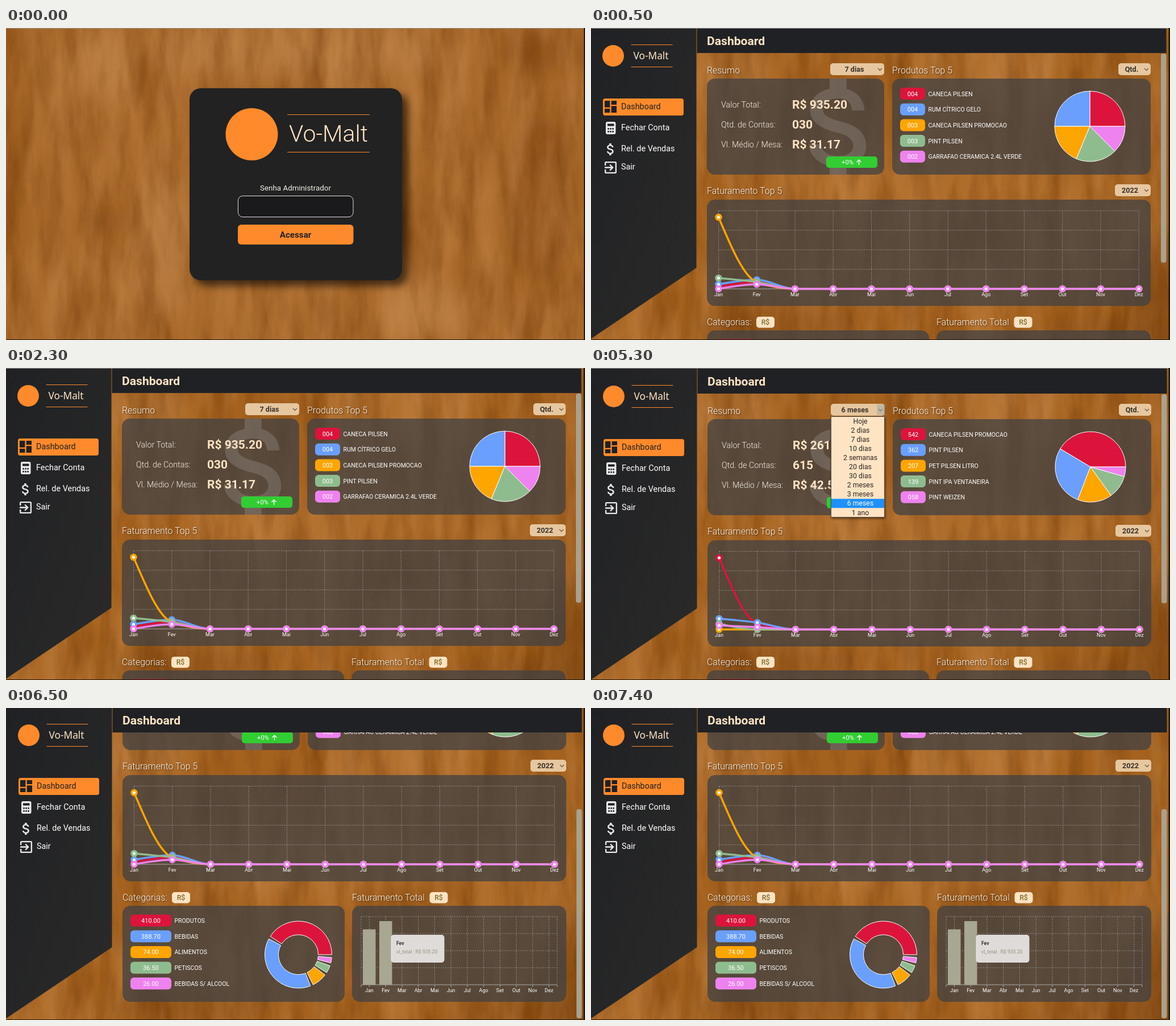
Animation of 1019 by 549 pixels, one loop 8 s. Source, as an HTML page:

```html
<!DOCTYPE html>
<html lang="pt">
<head>
<meta charset="utf-8">
<title>Dashboard</title>
<style>
  html, body { margin: 0; width: 100%; height: 100%; overflow: hidden; background: #a4642a; }
  #stage { display: block; font-family: Roboto, sans-serif; }
  .head { filter: drop-shadow(1px 1px 1px #0009); }
</style>
</head>
<body>
<svg id="stage" width="1019" height="549" viewBox="0 0 1019 549">
  <defs>
    <filter id="dark" x="0" y="0" width="1" height="1" color-interpolation-filters="sRGB">
      <feTurbulence type="fractalNoise" baseFrequency=".03 .007" numOctaves="5" seed="7"/>
      <feColorMatrix values="0 0 0 0 .4  0 0 0 0 .19  0 0 0 0 0  .9 0 0 0 -.36"/>
    </filter>
    <filter id="light" x="0" y="0" width="1" height="1" color-interpolation-filters="sRGB">
      <feTurbulence type="fractalNoise" baseFrequency=".024 .005" numOctaves="5" seed="21"/>
      <feColorMatrix values="0 0 0 0 .84  0 0 0 0 .6  0 0 0 0 .36  0 .8 0 0 -.32"/>
    </filter>
    <filter id="soft" x="-1" y="-1" width="3" height="3"><feGaussianBlur stdDeviation="22"/></filter>
    <filter id="shade" x="-.2" y="-.2" width="1.4" height="1.4">
      <feDropShadow dx="10" dy="10" stdDeviation="7" flood-color="#000" flood-opacity=".6"/>
    </filter>
    <linearGradient id="side" x2="1" y2="1">
      <stop stop-color="#202124"/><stop offset="1" stop-color="#2a2a29"/>
    </linearGradient>
  </defs>
</svg>
<script>
const ORANGE = '#ff8a2b', CREAM = '#ffe4c4', INK = '#202124', SAND = '#e6c79f';
const COLORS = ['#dc143c', '#6a9fff', '#ffa500', '#8fbc8f', '#ee82ee'];
const MONTHS = 'Jan Fev Mar Abr Mai Jun Jul Ago Set Out Nov Dez'.split(' ');
const BRAND = 'Vo-Malt';
const DOLLAR = 'M11.8 10.9c-2.27-.59-3-1.2-3-2.15 0-1.09 1.01-1.85 2.7-1.85 1.78 0 2.44.85 2.5 2.1h2.21c-.07-1.72-1.12-3.3-3.21-3.81V3h-3v2.16c-1.94.42-3.5 1.68-3.5 3.61 0 2.31 1.91 3.46 4.7 4.13 2.5.6 3 1.48 3 2.41 0 .69-.49 1.79-2.7 1.79-2.06 0-2.87-.92-2.98-2.1h-2.2c.12 2.19 1.76 3.42 3.68 3.83V21h3v-2.15c1.95-.37 3.5-1.5 3.5-3.55 0-2.84-2.43-3.81-4.7-4.4z';

const WEEK = {
  range: '7 dias', total: '935.20', bills: '030', mean: '31.17',
  products: [['004', 'CANECA PILSEN'], ['004', 'RUM CÍTRICO GELO'], ['003', 'CANECA PILSEN PROMOCAO'],
    ['003', 'PINT PILSEN'], ['002', 'GARRAFAO CERAMICA 2.4L VERDE']],
  lines: [[455, 447], [451, 443], [333, 447], [440, 447], [459, 451]]
};
const HALF_YEAR = {
  range: '6 meses', total: '26160.10', bills: '615', mean: '42.54',
  products: [['542', 'CANECA PILSEN PROMOCAO'], ['362', 'PINT PILSEN'], ['207', 'PET PILSEN LITRO'],
    ['139', 'PINT IPA VENTANEIRA'], ['058', 'PINT WEIZEN']],
  lines: [[333, 448], [440, 447], [459, 459], [449, 459], [452, 455]]
};
const CATEGORIES = [['410.00', 'PRODUTOS'], ['388.70', 'BEBIDAS'], ['74.00', 'ALIMENTOS'],
  ['36.50', 'PETISCOS'], ['26.00', 'BEBIDAS S/ ALCOOL']];
const RANGES = ['Hoje', '2 dias', '7 dias', '10 dias', '2 semanas', '20 dias', '30 dias', '2 meses', '3 meses', '6 meses', '1 ano'];

const text = (x, y, str, size, fill = '#f4eee6', extra = '') =>
  `<text x="${x}" y="${y}" font-size="${size}" fill="${fill}" ${extra}>${str}</text>`;
const MID = 'text-anchor="middle"', BOLD = 'font-weight="700"', THIN = 'font-weight="300"';
const mid = (x, y, str, size, fill, extra = '') => text(x, y, str, size, fill, MID + ' ' + extra);
const box = (x, y, w, h, r, fill, extra = '') =>
  `<rect x="${x}" y="${y}" width="${w}" height="${h}" rx="${r}" fill="${fill}" ${extra}/>`;
const path = (d, fill, extra = '') => `<path d="${d}" fill="${fill}" ${extra}/>`;
const stroke = (d, color, width = 1, extra = '') =>
  path(d, 'none', `stroke="${color}" stroke-width="${width}" ${extra}`);
const at = (x, y, body, scale = 1) => `<g transform="translate(${x} ${y}) scale(${scale})">${body}</g>`;
const card = (x, y, w, h) => box(x, y, w, h, 14, '#404244', 'fill-opacity=".74"');
const heading = (x, y, str) => text(x, y, str, 15.9, '#fff6ea', THIN + ' class="head"');

function wall(base, blots) {
  const spots = blots.map(([x, y, rx, ry, c]) =>
    `<ellipse cx="${x}" cy="${y}" rx="${rx}" ry="${ry}" fill="${c}" opacity=".5" filter="url(#soft)"/>`).join('');
  return box(0, 0, 1019, 549, 0, base) + spots +
    box(0, 0, 1019, 549, 0, '#000', 'filter="url(#dark)"') + box(0, 0, 1019, 549, 0, '#000', 'filter="url(#light)"');
}
const edges = right => box(right, 0, 1019 - right, 549, 0, '#21170f') + box(0, 548, 1019, 1, 0, '#21170f');
const topLine = box(0, 0, 1019, 1, 0, '#95918d');

function login() {
  const umber = '#7d430c', tan = '#c48a50';
  return wall('#a8682a', [[0, 200, 16, 400, umber], [930, 40, 60, 40, umber], [180, 340, 60, 22, umber],
      [500, 40, 260, 50, tan], [170, 60, 60, 60, tan], [270, 390, 50, 130, tan], [740, 500, 80, 50, tan], [940, 300, 60, 150, umber]]) +
    topLine + edges(1017) + box(323, 106, 374, 338, 20, INK, 'filter="url(#shade)"') +
    `<circle cx="432.5" cy="187" r="46" fill="${ORANGE}"/>` +
    stroke('M495 152.5H640M495 218.5H640', ORANGE) +
    mid(567.5, 200, BRAND, 41, CREAM, THIN) +
    mid(509.5, 286, 'Senha Administrador', 13.4) +
    box(408.5, 295.5, 202.5, 37, 8, '#1a1a1d', 'stroke="#e4e4e4"') +
    box(408, 346, 203.5, 35, 6, ORANGE) + mid(509.5, 369, 'Acessar', 15.2, INK, BOLD);
}

function sidebar() {
  const light = '#e9e9e9', keys = [0, 1, 2].map(i =>
    box(29.3 + i * 4, 176, 2.6, 2.6, 0, INK) + box(29.3 + i * 4, 181, 2.6, 2.6, 0, INK)).join('');
  return path('M-2 -2H185.5V422L-2 548z', 'url(#side)') +
    `<circle cx="39" cy="49" r="19" fill="${ORANGE}"/>` +
    stroke('M70.5 29.5H143.5M70.5 68.5H143.5', ORANGE) +
    mid(105.5, 55, BRAND, 17.3, CREAM, 'font-family="Noto Sans, sans-serif"') +
    box(21, 124, 142, 30, 4, ORANGE) +
    at(20.5, 124.5, path('M3 13h8V3H3zm0 8h8v-6H3zm10 0h8V11h-8zm0-18v6h8V3z', INK), 1.17) +
    box(26, 165, 17.5, 22, 3, light) + box(29, 168.5, 11.5, 4, 0, INK) + keys +
    at(20.5, 199.5, path(DOLLAR, light), 1.17) +
    at(20.5, 231.5, path('M10.1 15.6 11.5 17l5-5-5-5-1.4 1.4L12.7 11H3v2h9.7zM19 3H5c-1.1 0-2 .9-2 2v4h2V5h14v14H5v-4H3v4c0 1.1.9 2 2 2h14c1.1 0 2-.9 2-2V5c0-1.1-.9-2-2-2z', light), 1.17) +
    text(53, 143, 'Dashboard', 14.4, INK) +
    text(53, 180, 'Fechar Conta', 14.4, '#fff') + text(53, 217, 'Rel. de Vendas', 14.4, '#fff') + text(53, 249, 'Sair', 14.4, '#fff');
}

const select = (x, y, w, str) => box(x, y, w, 21, 5, SAND) +
  mid(x + w / 2 - 5, y + 14.7, str, 12.6, '#3a3129', BOLD) +
  stroke(`M${x + w - 11} ${y + 9}l3.5 3.5 3.5-3.5`, '#6b5b48', 1.3);

const legend = (rows, x, y, w) => rows.map(([value, name], i) => {
  const cy = y + i * 27.7;
  return box(x, cy - 10.5, w, 21, 6, COLORS[i]) + mid(x + w / 2, cy + 4, value, 11, '#fff') +
    text(x + w + 5.5, cy + 4, name, 10.5, '#fff');
}).join('');

// Slices run counter-clockwise from three o'clock.
function pie(rows, cx, cy, inner, outer, gap) {
  const sum = rows.reduce((s, r) => s + +r[0], 0), n = rows.length;
  const pt = (r, deg) => `${cx + r * Math.cos(deg * Math.PI / 180)} ${cy - r * Math.sin(deg * Math.PI / 180)}`;
  let a = 0;
  return rows.map(([v], i) => {
    const b = a + v / sum * (360 - n * gap), big = +(b - a > 180);
    const back = inner ? `L${pt(inner, b)}A${inner} ${inner} 0 ${big} 1 ${pt(inner, a)}` : `L${cx} ${cy}`;
    const d = `M${pt(outer, a)}A${outer} ${outer} 0 ${big} 0 ${pt(outer, b)}${back}z`;
    a = b + gap;
    return path(d, COLORS[i], 'stroke="#fff"');
  }).join('');
}

function grid(xs, top, bottom) {
  const left = xs[0], right = xs[xs.length - 1];
  const d = xs.map(x => `M${x} ${top}V${bottom}`).join('') +
    [0, 1, 2, 3].map(i => `M${left} ${top + i * (bottom - top) / 4}H${right}`).join('');
  return stroke(d, '#b5bcc0', 1, 'stroke-dasharray="2" opacity=".6"') + stroke(`M${left} ${bottom}H${right}`, '#aaa');
}

// Monotone cubic through evenly spaced points.
function curve(xs, ys) {
  const h = xs[1] - xs[0], n = xs.length, s = ys.slice(1).map((y, i) => (y - ys[i]) / h);
  const m = ys.map((_, i) => i && i < n - 1 ? (Math.sign(s[i - 1]) + Math.sign(s[i])) *
    Math.min(Math.abs(s[i - 1]), Math.abs(s[i]), Math.abs(s[i - 1] + s[i]) / 4) : 0);
  m[0] = (3 * s[0] - m[1]) / 2;
  return `M${xs[0]} ${ys[0]}` + s.map((_, i) =>
    `C${xs[i] + h / 3} ${ys[i] + m[i] * h / 3} ${xs[i + 1] - h / 3} ${ys[i + 1] - m[i + 1] * h / 3} ${xs[i + 1]} ${ys[i + 1]}`).join('');
}

function lineChart(lines) {
  const xs = MONTHS.map((_, i) => 224.5 + i * 67.25);
  return grid(xs, 321.5, 459) + xs.map((x, i) => mid(x, 472, MONTHS[i], 9, '#fff')).join('') +
    lines.map((start, k) => {
      const ys = xs.map((_, i) => start[i] ?? 459);
      return stroke(curve(xs, ys), COLORS[k], 3.4) + xs.map((x, i) =>
        `<circle cx="${x}" cy="${ys[i]}" r="4.4" fill="#fff" stroke="${COLORS[k]}" stroke-width="3.6"/>`).join('');
    }).join('');
}

function barChart() {
  const xs = MONTHS.map((_, i) => 638.4 + i * 28.75);
  return grid([624, ...xs, 969], 551, 671) +
    stroke([624, ...xs, 969].map(x => `M${x} 671v4`).join(''), '#aaa') +
    box(627, 573.5, 22.5, 97.5, 0, '#a8a791') + box(656, 559, 22.5, 112, 0, '#a8a791') +
    xs.map((x, i) => mid(x, 684, MONTHS[i], 9, '#fff')).join('') +
    box(676.5, 583, 94, 49, 5, '#ebe8e6', 'fill-opacity=".92"') +
    text(686, 601, 'Fev', 8.6, '#333', BOLD) + text(686, 616, 'vl_total : R$ 935.20', 8.6, '#96927f');
}

const badge = x => box(x, 508, 32, 19.5, 5, CREAM) + mid(x + 16, 522, 'R$', 12.3, '#7d6b2c', 'font-weight="500"');

function overview(d) {
  const row = (y, label, value) => text(229, y, label, 14.3, '#f4eee6', THIN) + text(354, y + 2, value, 21, CREAM, BOLD);
  return heading(204, 80, 'Resumo') + select(421, 62, 95, d.range) + card(204, 89, 312, 169) +
    `<svg x="204" y="89" width="312" height="169" viewBox="204 89 312 169">${at(321, 56, path(DOLLAR, '#d8dce0', 'opacity=".17"'), 9.9)}</svg>` +
    row(140, 'Valor Total:', 'R$ ' + d.total) + row(175, 'Qtd. de Contas:', d.bills) + row(210, 'Vl. Médio / Mesa:', 'R$ ' + d.mean) +
    box(414, 226, 90, 20, 5, '#32cd32') + mid(451.5, 240, '+0%', 11.2, '#fff') +
    stroke('M471.5 241V232M467.5 236l4-4 4 4', '#fff', 1.4) +
    heading(530, 80, 'Produtos Top 5') + select(928, 62, 57, 'Qtd.') + card(530, 89, 455, 169) +
    legend(d.products, 544, 115.5, 44) + pie(d.products, 878, 173, 0, 62, 0) +
    heading(204, 292, 'Faturamento Top 5') + select(922, 275, 63, '2022') + card(204, 302, 781, 187) + lineChart(d.lines);
}

const totals = () => heading(204, 523, 'Categorias:') + badge(291) + card(204, 532, 391, 169) +
  legend(CATEGORIES, 218, 558, 72) + pie(CATEGORIES, 513.5, 618, 35, 59, 5) +
  heading(608, 523, 'Faturamento Total') + badge(744.5) + card(608, 532, 377, 169) + barChart();

function dropdown() {
  const rows = RANGES.map((label, i) => {
    const on = label === HALF_YEAR.range, y = 84.8 + i * 16.05;
    return (on ? box(422, y, 93, 16, 0, '#1e90ff') : '') + mid(473, y + 12.2, label, 12.3, on ? '#fff' : '#2b2621');
  }).join('');
  return box(502, 63, 13.5, 19, 3, '#9aa4a0', 'opacity=".45"') + stroke('M515.5 63V82', '#6f99a8') +
    box(421.5, 84.5, 94, 177, 0, CREAM, 'stroke="#5a4c40" style="filter:drop-shadow(1px 2px 2px #0008)"') + rows;
}

function dashboard({ data, dx = 0, dy = 0, scroll = 0, lower = '0 0', thumb = 45, menu = '' }) {
  const content = `<svg x="186" y="44" width="826" height="505" viewBox="186 44 826 505">` +
    at(0, -scroll, overview(data) + `<g transform="translate(${lower})">${totals()}</g>`) + '</svg>';
  return wall('#a5621f', [[1000, 480, 60, 120, '#75400c'], [560, 280, 240, 60, '#b97838'], [700, 70, 120, 60, '#b97838'],
      [240, 80, 60, 40, '#c48a50'], [330, 520, 160, 30, '#7a430d'], [900, 540, 140, 30, '#7a430d'], [80, 540, 90, 30, '#b97838']]) +
    at(dx, dy, content + box(1003, thumb, 9.5, 368, 4, '#aaa18c') + sidebar() +
      box(186.5, 0, 826, 44, 0, INK) + text(204, 30, 'Dashboard', 21.1, CREAM, BOLD) + menu) +
    (dy < 0 ? '' : topLine) + edges(1016.5);
}

const scenes = [
  [0, login()],
  [500, dashboard({ data: WEEK })],
  [3500, dashboard({ data: HALF_YEAR, dx: 1, dy: 1, lower: '-1 -1', menu: dropdown() })],
  [6500, dashboard({ data: WEEK, dx: 1, dy: -1, scroll: 183, thumb: 179 })]
];
const stage = document.getElementById('stage');
stage.insertAdjacentHTML('beforeend', scenes.map(s => `<g display="none">${s[1]}</g>`).join(''));
const groups = [...stage.children].slice(1);
const begin = performance.now();
let shown = -1;

function tick() {
  const ms = (performance.now() - begin) % 8000;
  const now = scenes.filter(s => s[0] <= ms).length - 1;
  if (now !== shown) {
    groups.forEach((g, i) => g.setAttribute('display', i === now ? 'inline' : 'none'));
    shown = now;
  }
  requestAnimationFrame(tick);
}
tick();
</script>
</body>
</html>
```
